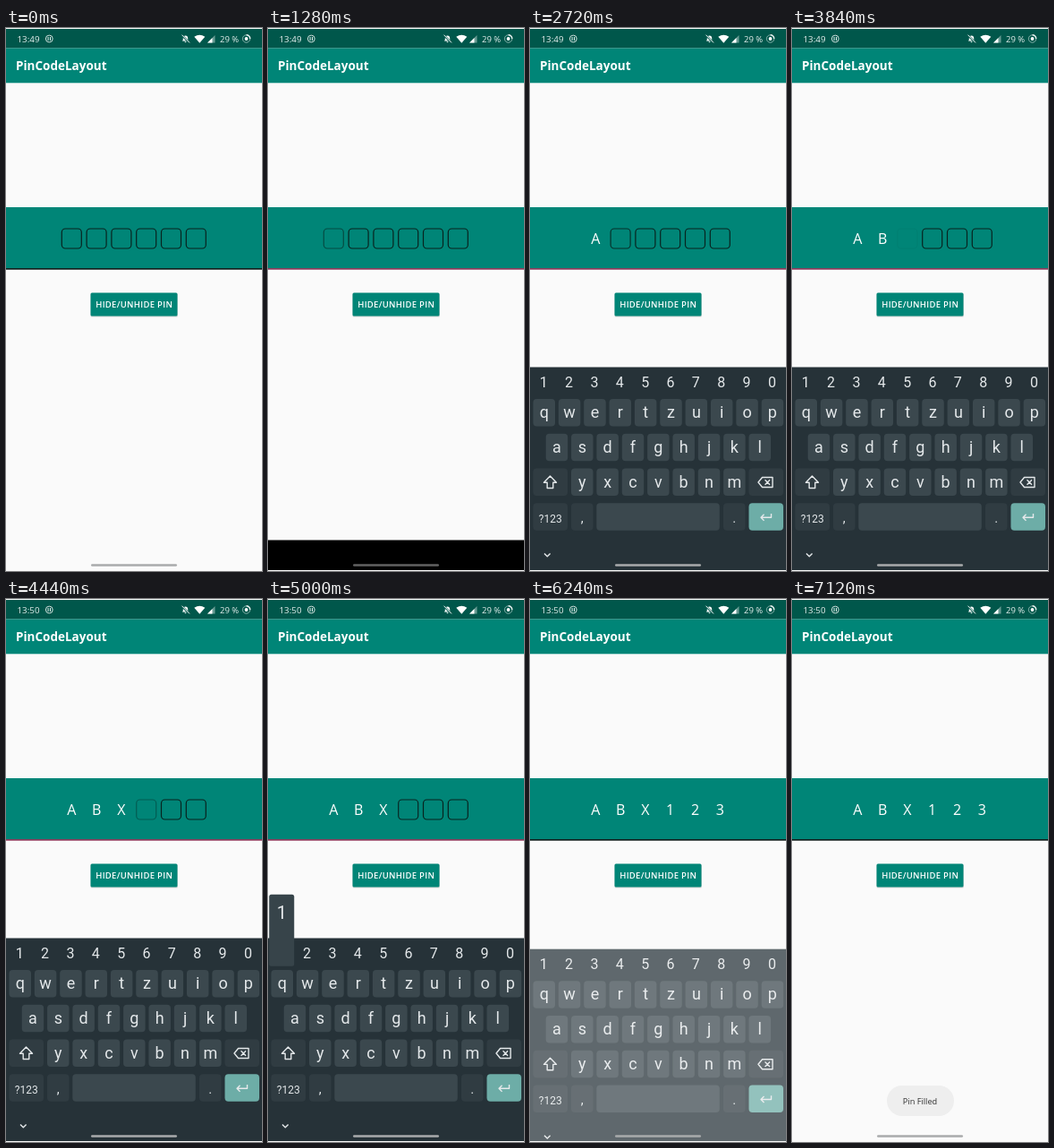
Recreate the animation shown at these times as an HTML page. Size 286x606 px, loop 8 s.

```html
<!DOCTYPE html>
<html lang="en">
<head>
<meta charset="utf-8">
<title>Pin entry</title>
<style>
  html, body { margin: 0; width: 100%; height: 100%; overflow: hidden; background: #fafafa; }
  svg { display: block; width: 286px; height: 606px; font-family: "Open Sans", sans-serif; }
  .mid { text-anchor: middle; }
  .keys { font-family: Roboto, sans-serif; fill: #e4e8ea; }
  .line { fill: none; stroke: #e4e8ea; stroke-width: 1.4; stroke-linejoin: round; }
</style>
</head>
<body>
<svg viewBox="0 0 286 606">
  <rect width="286" height="606" fill="#fafafa"/>

  <rect y="1" width="286" height="21.5" fill="#00574b"/>
  <g fill="#e6efed" font-size="9.8">
    <text id="clock" x="12.5" y="15.6"></text>
    <text x="239" y="15.6" font-size="9.5">29 %</text>
    <path d="M46.6 10v4h1v-4zM49 10v4h1v-4z"/>
    <path d="M196.8 14.6c1-.8 1-2 1-3.2 0-1.700 1-2.900 2.700-2.900s2.700 1.200 2.700 2.900c0 1.200 0 2.400 1 3.200zM199.500 15.200h2a1 1 0 0 1-2 0z" fill="#fff"/>
    <path d="M210.300 9.800Q216.300 5.600 222.300 9.800L216.300 16.800z" fill="#fff"/>
    <path d="M225 16.500L233.500 8v8.500z" opacity=".45"/>
    <path d="M225 16.500L230.500 11v5.500z" fill="#fff"/>
  </g>
  <path d="M196.500 8l8.500 8.500" stroke="#00574b" stroke-width="2.200"/>
  <path d="M196.500 7.700l8.500 8.700" stroke="#fff" stroke-width="1"/>
  <g fill="none" stroke="#e6efed">
    <circle cx="48.300" cy="12" r="3.900" stroke-width=".9"/>
    <circle cx="268.500" cy="12" r="4.200" opacity=".55"/>
    <path d="M268.500 7.800a4.200 4.200 0 0 1 4.200 4.200" stroke-width="1.500"/>
  </g>
  <circle cx="268.500" cy="12" r="1.900" fill="#fff"/>

  <rect y="22.500" width="286" height="38.800" fill="#008577"/>
  <text x="11" y="47.300" font-size="13.500" font-weight="700" fill="#fff">PinCodeLayout</text>

  <rect y="200" width="286" height="68.500" fill="#008577"/>
  <rect id="underline" y="268" width="286" height="1.700"/>
  <g id="pin"></g>

  <rect x="94.500" y="296.500" width="97.500" height="26" rx="1.500" fill="#000" opacity=".15"/>
  <rect x="94.500" y="295.500" width="97" height="26" rx="1.500" fill="#008577"/>
  <text class="mid" x="143.200" y="312.300" font-size="9.500" font-weight="600" letter-spacing=".3" fill="#fff">HIDE/UNHIDE PIN</text>

  <rect id="navBar" y="571.500" width="286" height="34" fill="#000"/>
  <g id="keyboard" class="keys">
    <rect y="378.500" width="286" height="290" fill="#263238"/>
  </g>
  <g id="popup" class="keys">
    <rect width="28" height="80" rx="2.500" fill="#37444a"/>
    <text class="mid" x="14" y="27.500" font-size="20"></text>
  </g>

  <g id="toast">
    <rect x="106" y="543" width="75" height="34" rx="17" fill="#eee"/>
    <text class="mid" x="143" y="563.800" font-size="9.200" fill="#303030">Pin Filled</text>
  </g>
  <rect id="home" x="95" y="598.300" width="96" height="2.500" rx="1.250"/>
  <rect y="605" width="286" height="1" fill="#fafafa"/>
</svg>
<script>
const LOOP = 8000, STEP = 28.35;
const FOCUS = 1120, BLUR = 6160, BLINK = 773;
const OPEN = 1320, CLOSE = 6180;
const PRESSES = [["a", 2240], ["b", 3200], ["x", 4080], ["1", 5040], ["2", 5480], ["3", 5960]];

const $ = id => document.getElementById(id);
const clamp = v => Math.min(1, Math.max(0, v));
const keyboard = $("keyboard"), popup = $("popup");
const keyAt = {};

function add(parent, tag, attrs, text = "") {
  const el = document.createElementNS("http://www.w3.org/2000/svg", tag);
  for (const name in attrs) el.setAttribute(name, attrs[name]);
  el.textContent = text;
  return parent.appendChild(el);
}

function key(x, y, width, label, fill = "#3b484e", size = 18) {
  if (fill) add(keyboard, "rect", { x, y, width, height: 30.5, rx: 4, fill });
  add(keyboard, "text", { x: x + width / 2, y: y + 21.3, "font-size": size, class: "mid" }, label);
  keyAt[label] = { x: x + width / 2, bottom: y + 30.5 };
}

function row(labels, x, y, fill, size) {
  [...labels].forEach((label, i) => key(x + i * STEP, y, 24.5, label, fill, size));
}

const DIM = "#303c42";
row("1234567890", 3, 379.3, "", 16);
row("qwertzuiop", 3.5, 414);
row("asdfghjkl", 17.7, 452.7);
key(3.5, 491.5, 38.5, "", DIM);
row("yxcvbnm", 46, 491.5);
key(244.5, 491.5, 38.5, "", DIM);
key(3.5, 530.3, 38.5, "?123", DIM, 12);
key(46, 530.3, 24.5, ",", DIM, 15);
key(74.3, 530.3, 137.5, "");
key(216, 530.3, 24.5, ".", DIM, 15);
key(244.5, 530.3, 38.5, "", "#6dada7");
[
  "M22.500 500l-7 7.200h3.700v6.300h6.600v-6.300h3.700z",
  "M259.500 501.500h11.500v11h-11.500l-4.500-5.500zM262.500 504.300l5.500 5.500m0-5.500l-5.500 5.500",
  "M269.500 542v4.300h-11.500m3.500-3.500l-3.500 3.500l3.500 3.500",
  "M16 586.500l3.300 3.300l3.300-3.300"
].forEach(d => add(keyboard, "path", { d, class: "line" }));

const cells = PRESSES.map(([label, time], i) => {
  const x = 73.3 + i * 27.8;
  return {
    time,
    box: add($("pin"), "rect", { x: x - 11, y: 224, width: 22, height: 22, rx: 4, fill: "none", stroke: "#08231f", "stroke-width": 1.2 }),
    char: add($("pin"), "text", { x, y: 241.3, class: "mid", "font-size": 16, fill: "#fff" }, label.toUpperCase())
  };
});

// The focused box fades out and back in at a constant rate.
function blink(t) {
  const phase = (t - FOCUS) / BLINK % 1;
  return Math.abs(1 - 2 * phase);
}

function render(t) {
  const focused = t >= FOCUS && t < BLUR;
  const current = focused ? cells.findIndex(cell => t < cell.time) : -1;
  cells.forEach(({ time, box, char }, i) => {
    box.style.opacity = t >= time ? 0 : i === current ? blink(t) : 1;
    char.style.opacity = t >= time ? 1 : 0;
  });

  $("clock").textContent = t < 4400 ? "13:49" : "13:50";
  $("underline").setAttribute("fill", focused ? "#8c3a5c" : "#10201e");

  const enter = 1 - (1 - clamp((t - OPEN) / 240)) ** 2;
  const leave = clamp((t - CLOSE) / 200);
  keyboard.setAttribute("transform", `translate(0 ${40 * (1 - enter + leave)})`);
  keyboard.style.opacity = enter * (1 - 0.9 * leave) * (leave < 1);

  const blackNav = t >= 1240 && t < OPEN + 240;
  $("navBar").style.opacity = blackNav ? 1 : 0;
  $("home").setAttribute("fill", blackNav ? "#626262" : "#a9abac");

  const press = PRESSES.find(([, time]) => t >= time - 80 && t < time + 40);
  popup.style.display = press ? "" : "none";
  if (press) {
    const { x, bottom } = keyAt[press[0]];
    popup.setAttribute("transform", `translate(${x - 14} ${bottom - 80})`);
    popup.lastElementChild.textContent = press[0];
  }

  $("toast").style.opacity = clamp((t - 6360) / 200);
}

const start = performance.now();
function frame() {
  render((performance.now() - start) % LOOP);
  requestAnimationFrame(frame);
}
frame();
</script>
</body>
</html>
```
